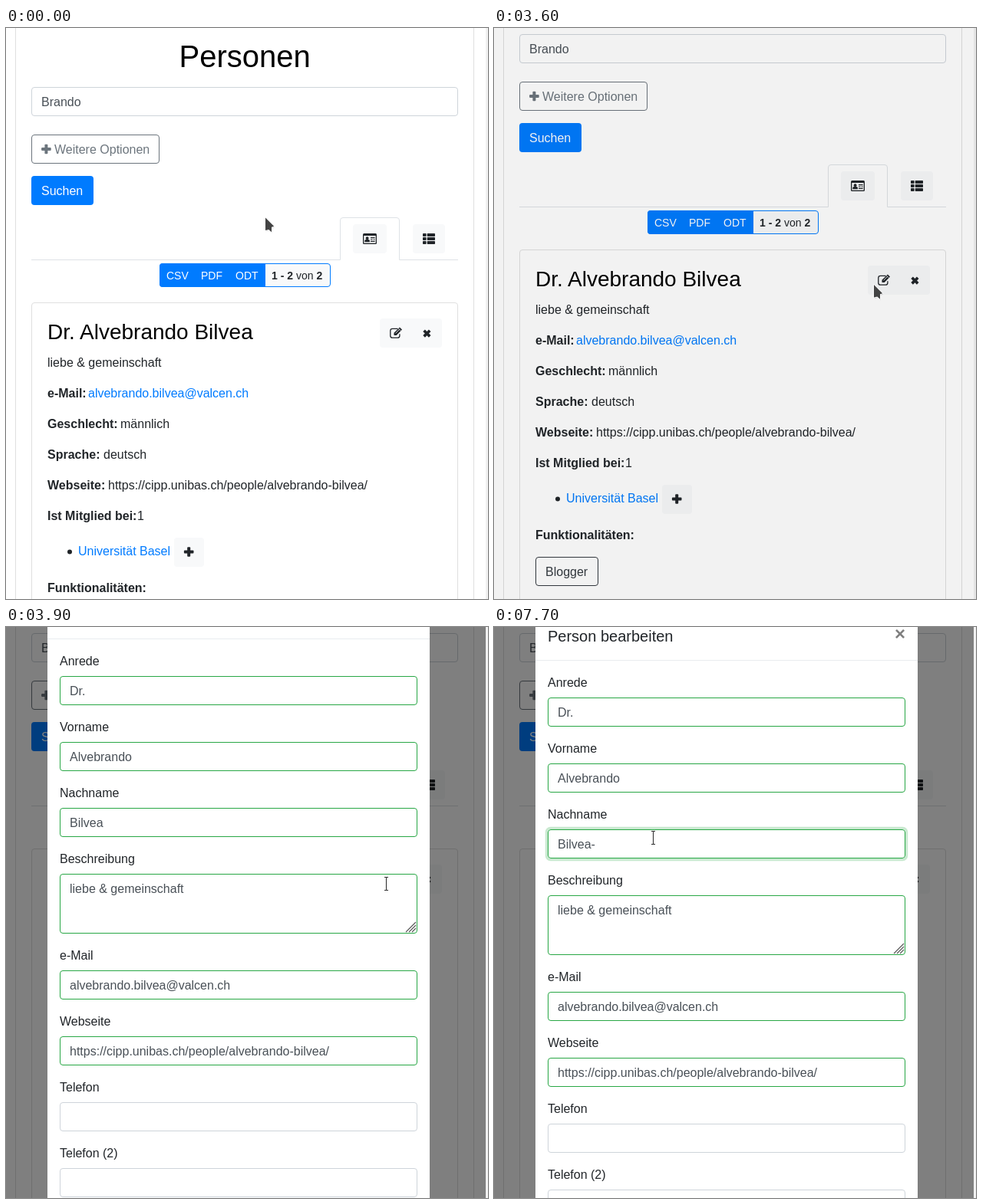
An HTML page that plays this animation: 628x745 px, repeating every 8 s.

```html
<!DOCTYPE html>
<html lang="de">
<head>
<meta charset="utf-8">
<title>Personen</title>
<style>
html, body { margin: 0; width: 100%; height: 100%; overflow: hidden; background: #fff; }
svg { display: block; width: 628px; height: 745px; }
text { font-family: "Liberation Sans", Arial, sans-serif; font-size: 16px; fill: #212529; white-space: pre; }
.b { font-weight: 700; }
</style>
</head>
<body>
<svg id="stage" viewBox="0 0 628 745"></svg>
<script>
const LOOP = 8000, STEP = 100;
const DARK = '#212529', BLUE = '#007bff', LIGHT = '#f8f9fa', GREEN = '#28a745', GRAY = '#ced4da', INK = '#495057';
const FIRST = 'Alvebrando', LAST = 'Bilvea';
const MAIL = 'alvebrando.bilvea@valcen.ch';
const SITE = 'https://cipp.unibas.ch/people/alvebrando-bilvea/';
const NOTE = 'liebe & gemeinschaft';

const esc = s => s.replace(/&/g, '&amp;');
const text = (x, y, s, fill = DARK, size = 16, extra = '') =>
  `<text x="${x}" y="${y}" style="fill:${fill};font-size:${size}px" ${extra}>${esc(s)}</text>`;
const bold = (x, y, s) => text(x, y, s, DARK, 16, 'class="b"');
const rect = (x, y, w, h, fill, r = 0, extra = '') =>
  `<rect x="${x}" y="${y}" width="${w}" height="${h}" rx="${r}" fill="${fill}" ${extra}/>`;
// Bordered box whose outer edge is x, y, w, h
const box = (x, y, w, h, stroke, fill = '#fff', extra = '') =>
  rect(x + .5, y + .5, w - 1, h - 1, fill, 3.5, `stroke="${stroke}" ${extra}`);
const path = (d, fill, extra = '') => `<path d="${d}" fill="${fill}" ${extra}/>`;
const line = (d, stroke, w = 1, extra = '') => path(d, 'none', `stroke="${stroke}" stroke-width="${w}" ${extra}`);

const plus = (cx, cy, fill) =>
  rect(cx - 6.3, cy - 2, 12.6, 4, fill, 1) + rect(cx - 2, cy - 6.3, 4, 12.6, fill, 1);

function cardIcon() {
  return rect(465, 268, 18, 14, DARK, 1.5) + rect(466.3, 271, 15.4, 9.7, LIGHT) +
    `<circle cx="470.6" cy="274.2" r="1.9" fill="${DARK}"/>` +
    path('M467.3 279.3v-1.6q0-1.7 1.7-1.7h3.2q1.7 0 1.7 1.7v1.6z', DARK) +
    line('M475 273.6h5.6M475 276h2.6M478.6 276h2M475 278.4h5.6', DARK, 1.2);
}

function listIcon() {
  return [268, 273, 278].map(y => rect(543, y, 4.6, 4, DARK, .7) + rect(548.7, y, 10.3, 4, DARK, .7)).join('');
}

function editIcon() {
  return line('M510.5 392.3h-7q-2.7 0-2.7 2.7v6.5q0 2.7 2.7 2.7h6.7q2.7 0 2.7-2.7v-2.3', DARK, 1.3) +
    path('M505.5 401v-3.2l7.4-7.3 3.1 3.1-7.3 7.4z', DARK) +
    line('M507.6 398.2l5-5', LIGHT, .9) + line('M511.4 392l3.1 3.1', LIGHT, .8);
}

function entry(y, label, x, value, fill = DARK) {
  return bold(54, y, label) + text(x, y, value, fill);
}

function page() {
  return text(225.5, 51, 'Personen', '#000', 40) +
    box(33, 77, 556, 38, GRAY) + text(46, 102, 'Brando', INK) +
    box(33, 139, 167, 38, '#6c757d') + plus(52.4, 158, '#6c757d') + text(63, 164, 'Weitere Optionen', '#6c757d') +
    rect(33, 193, 81, 38, BLUE, 4) + text(46, 218, 'Suchen', '#fff') +
    line('M33 302.5H435.5V251q0-3.5 3.5-3.5H509q3.5 0 3.5 3.5V302.5H589', '#dee2e6') +
    rect(452, 256, 44, 38, LIGHT, 4) + cardIcon() +
    rect(530, 256, 42, 38, LIGHT, 4) + listIcon() +
    box(200, 307, 223, 31, BLUE, LIGHT) +
    path('M338 307H204q-4 0-4 4v23q0 4 4 4H338z', BLUE) +
    text(209, 328, 'CSV', '#fff', 14) + text(254, 328, 'PDF', '#fff', 14) + text(299, 328, 'ODT', '#fff', 14) +
    `<text x="346" y="328" style="font-size:14px"><tspan class="b">1 - 2</tspan> von <tspan class="b">2</tspan></text>` +
    box(33, 358, 556, 700, '#dfdfdf') +
    text(54, 406, `Dr. ${FIRST} ${LAST}`, '#000', 28) +
    rect(487, 379, 81, 38, LIGHT, 4) + rect(487, 379, 42, 38, '#e2e6ea', 4, 'id="hover"') + editIcon() +
    line('M544.6 394.8l7.6 7.6M552.2 394.8l-7.6 7.6', DARK, 3.7) +
    text(54, 442, NOTE) +
    entry(482, 'e-Mail:', 107, MAIL, BLUE) +
    entry(522, 'Geschlecht:', 149, 'männlich') +
    entry(562, 'Sprache:', 127, 'deutsch') +
    entry(602, 'Webseite:', 133, SITE) +
    entry(642, 'Ist Mitglied bei:', 171, '1') +
    `<circle cx="83" cy="683.5" r="3" fill="${DARK}"/>` + text(94, 688, 'Universität Basel', BLUE) +
    rect(219, 665, 39, 38, LIGHT, 4) + plus(238.2, 683.5, DARK) +
    bold(54, 736, 'Funktionalitäten:') +
    box(54, 759, 82, 38, '#343a40') + text(67, 784, 'Blogger', '#343a40');
}

// Label, value, top of the input, height
const FIELDS = [
  ['Anrede', 'Dr.', 92, 38], ['Vorname', FIRST, 178, 38], ['Nachname', LAST, 264, 38],
  ['Beschreibung', NOTE, 350, 78], ['e-Mail', MAIL, 476, 38], ['Webseite', SITE, 562, 38],
  ['Telefon', '', 648, 38], ['Telefon (2)', '', 734, 38]
];

function field([label, value, y, h]) {
  const id = label === 'Nachname' ? 'id="surname"' : '';
  return text(70, y - 14, label) + box(70, y, 466, h, value ? GREEN : GRAY) + text(83, y + 25, value, INK, 16, id);
}

function modal() {
  return rect(54, -19, 498, 1400, '#fff', 4) + text(70, 19, 'Person bearbeiten', DARK, 20) +
    text(522, 17, '×', '#7f7f7f', 24, 'class="b"') +
    line('M54 43.5H552', '#e9ecef') +
    rect(68.4, 262.4, 469.2, 41.2, 'none', 5, 'id="ring" stroke="#28a745" stroke-opacity=".25" stroke-width="3.2"') +
    FIELDS.map(field).join('') +
    line('M521 426l13-13M525 426l9-9M529 426l5-5', '#555', 1.1) +
    rect(133, 274, 1, 19, INK, 0, 'id="caret"');
}

const arrowShape = 'M0 0L11.2 11.2L8 12.2V18.8L4.3 15.6L0 16.4Z';

document.getElementById('stage').innerHTML =
  rect(0, 0, 628, 745, '#fff') + line('M12.5 0V745M609.5 0V745', '#dfdfdf') +
  rect(625, 0, 3, 745, '#f0f0f0') +
  `<g id="page">${page()}</g>` +
  rect(0, 0, 628, 745, '#000', 0, 'id="shade"') +
  rect(625, 0, 3, 745, '#f0f0f0', 0, 'id="track"') +
  `<g id="modal">${modal()}</g>` +
  `<g id="arrow">${path(arrowShape, '#000', 'opacity=".12" transform="translate(1 1.5)"')}` +
  `${path(arrowShape, '#434343', 'stroke="#fff" stroke-width="1.6" paint-order="stroke" stroke-linejoin="round"')}</g>` +
  `<g id="beam">${line('M-2.5 -8.5H2.5M0 -8.5V8.5M-2.5 8.5H2.5', '#fff', 2.4, 'opacity=".7"')}` +
  `${line('M-2.5 -8.5H2.5M0 -8.5V8.5M-2.5 8.5H2.5', '#333', 1.1)}</g>`;

const el = id => document.getElementById(id);
const show = (id, on) => el(id).setAttribute('visibility', on ? 'inherit' : 'hidden');
const move = (id, x, y) => el(id).setAttribute('transform', `translate(${x} ${y})`);

// Linear interpolation through [time, value] keys
function track(keys, t) {
  if (t <= keys[0][0]) return keys[0][1];
  for (let i = 1; i < keys.length; i++) {
    const [t0, a] = keys[i - 1], [t1, b] = keys[i];
    if (t <= t1) return a + (b - a) * (t - t0) / (t1 - t0);
  }
  return keys[keys.length - 1][1];
}

const cursorX = [[200, 338], [1100, 426], [1900, 426], [2400, 495], [4400, 495], [4800, 268], [4900, 268], [5400, 224], [5800, 208], [5900, 207]];
const cursorY = [[200, 247.5], [1100, 380.5], [1800, 380.5], [1900, 370], [2400, 335], [4400, 335], [4800, 169], [4900, 169], [5400, 254], [5800, 275]];
const scroll = [[1500, 0], [1600, 14], [1700, 46], [1800, 65], [1900, 69]];
const shade = [[3500, 0], [3600, .05], [3700, .39], [3800, .5]];
const drop = [[3800, -120], [3900, -28], [4000, 0]];
const fade = [[3700, 0], [3800, .4], [3900, 1]];

function draw(time) {
  const t = Math.floor(time % LOOP / STEP) * STEP;
  const x = track(cursorX, t), y = track(cursorY, t), shift = track(drop, t);
  const open = t >= 3800;

  move('page', 0, -Math.round(track(scroll, t)));
  show('hover', t >= 2900 && t < 3600);
  el('shade').setAttribute('opacity', track(shade, t));
  show('track', open);

  show('modal', open);
  el('modal').setAttribute('opacity', track(fade, t));
  move('modal', 0, shift);
  show('ring', open && t >= 6500);
  el('surname').textContent = LAST + (t >= 7600 ? '-' : '');
  show('caret', t === 7600);

  const typing = open && x > 70 && x < 536 &&
    FIELDS.some(([, , top, h]) => y >= top + shift && y < top + shift + h);
  show('arrow', !typing);
  show('beam', typing);
  move('arrow', x, y);
  move('beam', Math.round(x) + .5, Math.round(y));
}

const start = performance.now();
function tick() {
  draw(performance.now() - start);
  requestAnimationFrame(tick);
}
tick();
</script>
</body>
</html>
```
